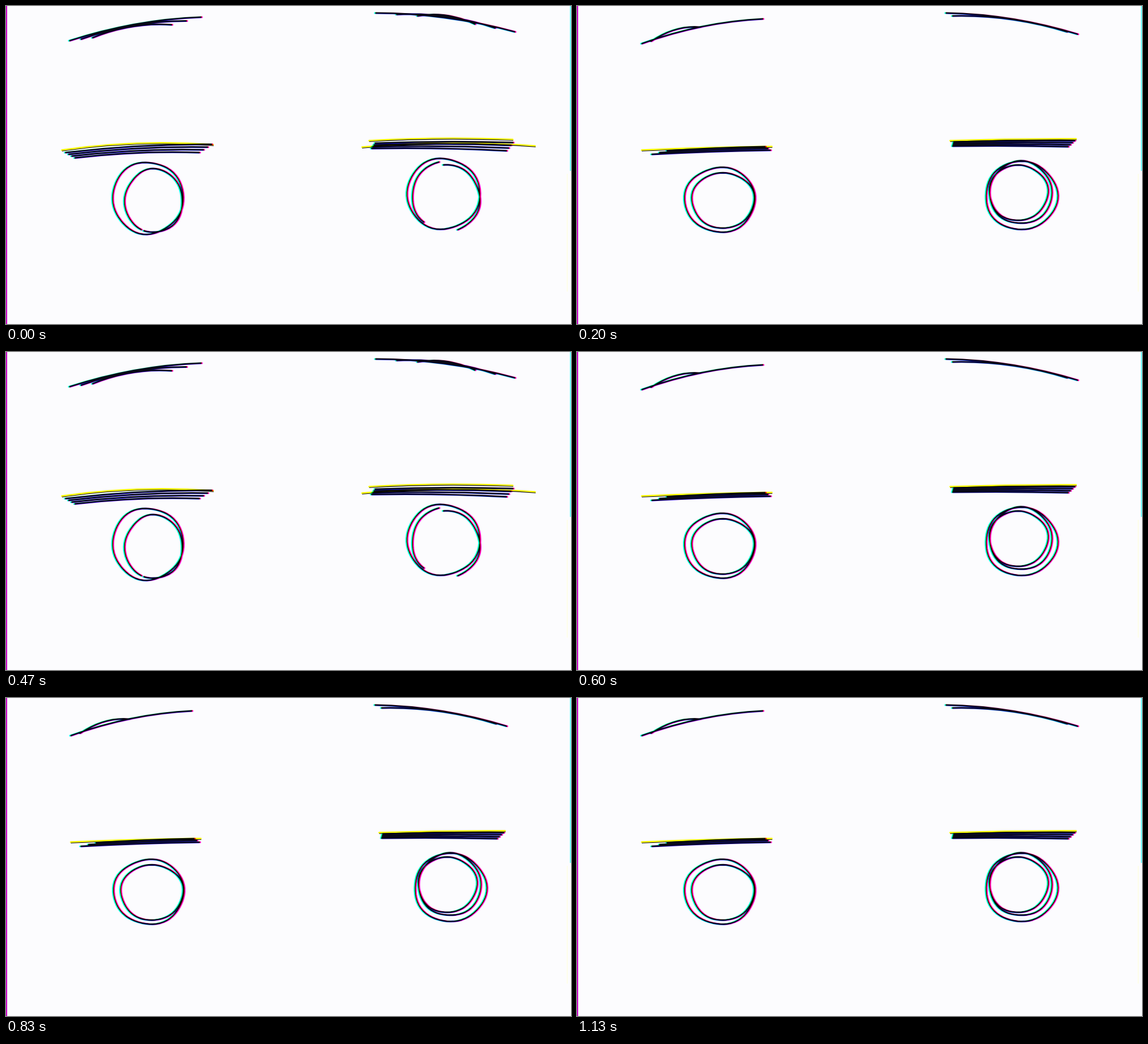
An HTML page with a canvas for the animation above (1.16 s loop, 960 px wide and 540 px high).

```html
<!DOCTYPE html>
<html lang="en">
<head>
<meta charset="utf-8">
<title>Sketched eyes</title>
<style>
html, body { margin: 0; height: 100%; overflow: hidden; background: #fcfcfe; }
canvas { display: block; }
</style>
</head>
<body>
<canvas id="stage" width="960" height="540"></canvas>
<script>
const ctx = document.getElementById('stage').getContext('2d');
const mix = (a, b, t) => a + (b - a) * t;

// One pen stroke, bowed upwards by `bend`.
function stroke(path, [x1, y1, x2, y2], bend) {
  path.moveTo(x1, y1);
  path.quadraticCurveTo((x1 + x2) / 2, (y1 + y2) / 2 - bend, x2, y2);
}

class Pose {
  ink = new Path2D();
  glow = new Path2D();

  // `count` strokes fanned evenly between a first and a last one.
  sheaf(first, last, count, bend) {
    for (let i = 0; i < count; i++) {
      stroke(this.ink, first.map((v, k) => mix(v, last[k], i / (count - 1))), bend);
    }
    return this;
  }

  rim(line, bend = 0) {
    stroke(this.glow, line, bend);
    return this;
  }

  // Hand-drawn ring: an ellipse with a slight wobble; angles in degrees.
  ring(cx, cy, rx, ry, start = 0, sweep = 360) {
    const steps = 60;
    for (let i = 0; i <= steps; i++) {
      const a = (start + sweep * i / steps) * Math.PI / 180;
      const wobble = 1 + 0.014 * Math.sin(3 * a + cx) + 0.01 * Math.sin(5 * a + cy);
      const x = cx + rx * wobble * Math.cos(a), y = cy + ry * wobble * Math.sin(a);
      if (i) this.ink.lineTo(x, y); else this.ink.moveTo(x, y);
    }
    return this;
  }
}

// Each pose: brows, lids, irises.
const poses = {
  A: new Pose()
    .sheaf([108, 59, 332, 19], [147, 54, 282, 32], 3, 16)
    .sheaf([628, 12, 865, 44], [699, 17, 797, 31], 3, 16)
    .rim([95, 245, 352, 236], 14)
    .sheaf([101, 249, 350, 235], [117, 258, 329, 249], 4, 8)
    .rim([617, 229, 861, 227], 6).rim([605, 240, 899, 238], 12)
    .sheaf([627, 233, 862, 232], [621, 242, 851, 246], 4, 4)
    .ring(241, 326, 60, 61, 190, -370).ring(251, 331, 49, 54, 115, 355)
    .ring(743, 319, 62, 60, 82, 378).ring(748, 327, 57, 57, 265, 165)
    .ring(748, 322, 58, 58, 258, -128),
  B: new Pose()
    .sheaf([110, 60, 287, 17], [137, 60, 347, 22], 2, 16)
    .sheaf([625, 8, 857, 47], [657, 5, 780, 24], 3, 16)
    .rim([103, 243, 331, 240])
    .sheaf([105, 244, 331, 242], [125, 250, 334, 246], 3, 1)
    .rim([615, 231, 866, 230])
    .sheaf([645, 235, 842, 233], [628, 240, 840, 234], 3, 2)
    .ring(240, 330, 54, 57, -48, -240).ring(239, 329, 51, 48).ring(238, 332, 55, 53)
    .ring(745, 323, 58, 57).ring(744, 320, 50, 53).ring(748, 322, 54, 56),
  C: new Pose()
    .sheaf([110, 64, 316, 22], [126, 60, 210, 36], 2, 16)
    .sheaf([627, 12, 851, 48], [638, 17, 833, 44], 2, 16)
    .rim([110, 245, 331, 239], 2)
    .sheaf([153, 246, 320, 239], [127, 252, 329, 245], 3, 2)
    .rim([634, 229, 848, 226], 2)
    .sheaf([640, 231, 846, 229], [638, 238, 835, 239], 4, 2)
    .ring(243, 329, 60, 55).ring(248, 330, 53, 47)
    .ring(755, 322, 61, 58).ring(754, 317, 53, 53).ring(750, 317, 50, 47)
};
const order = 'ACABCBC';

function trace(path, color, width, dx, dy) {
  ctx.save();
  ctx.translate(dx, dy);
  ctx.strokeStyle = color;
  ctx.lineWidth = width;
  ctx.stroke(path);
  ctx.restore();
}

function bar(color, x, y, w, h) {
  ctx.fillStyle = color;
  ctx.fillRect(x, y, w, h);
}

function draw({ ink, glow }) {
  ctx.globalCompositeOperation = 'source-over';
  bar('#fcfcfe', 0, 0, 960, 540);
  bar('#c0c', 0, 0, 2, 540);
  bar('#7ff', 958, 0, 2, 280);
  bar('#ffffd8', 953, 285, 1, 200);
  ctx.lineCap = ctx.lineJoin = 'round';
  ctx.globalCompositeOperation = 'multiply';
  trace(glow, '#ff0', 2.8, 0, -0.3);
  trace(glow, '#0a0818', 1.1, 0.5, 1.2);
  // Misregistered colour plates
  trace(ink, '#ffff18', 2.4, 0, -0.2);
  trace(ink, '#08ffff', 3, -1.2, 0);
  trace(ink, '#ff08ff', 3, 0.9, 0);
}

function tick() {
  const ticks = Math.floor(performance.now() % 1160 / 10);
  const step = Math.floor((ticks + 0.4) * 0.3);
  draw(poses[order[step % order.length]]);
  requestAnimationFrame(tick);
}
tick();
</script>
</body>
</html>
```
